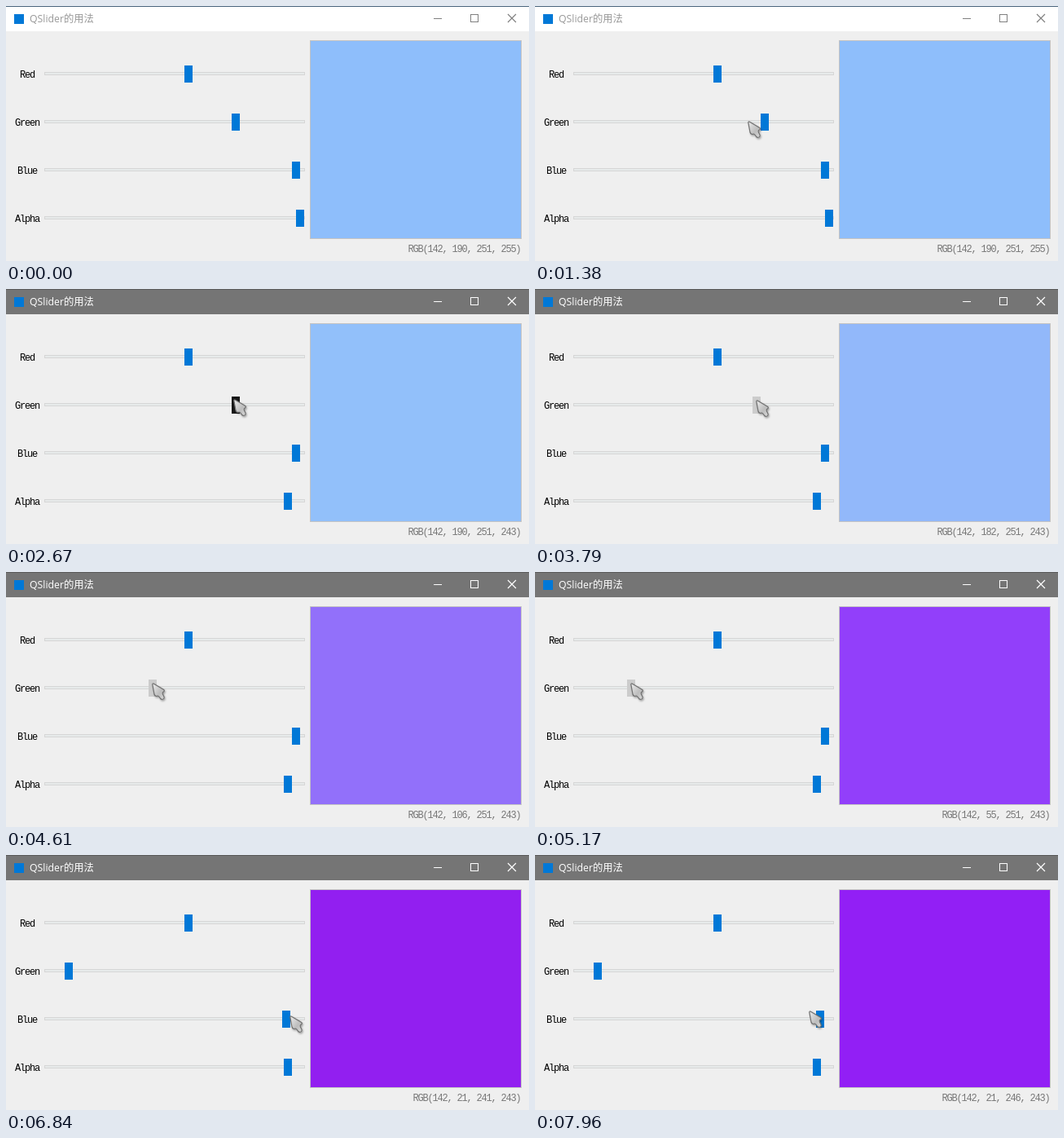
These frames come from a looping animation (642 px wide and 313 px high, 8000 ms). An HTML page:

```html
<!DOCTYPE html>
<html lang="zh">
<head>
<meta charset="utf-8">
<title>QSlider的用法</title>
<style>
  html, body { margin: 0; width: 100%; height: 100%; overflow: hidden; background: #efefef; }
  svg { display: block; width: 642px; height: 313px; }
  rect { shape-rendering: crispEdges; }
  .caption { font: 12.3px "Open Sans", "Noto Sans CJK SC", "Noto Sans CJK", sans-serif; fill: #999; }
  .mono { font: 12px "Liberation Mono", monospace; letter-spacing: -1.2px; }
  #bar { fill: #fff; }
  #edge { fill: #49647c; }
  #buttons { stroke: #808080; fill: none; }
  .active #bar { fill: #757575; }
  .active #edge { fill: #5b5b5b; }
  .active .caption { fill: #fff; }
  .active #buttons { stroke: #fff; }
  .groove { fill: #e7eaea; stroke: #d6d6d6; }
  .handle { fill: #0078d7; }
  .handle.hover { fill: #171717; }
  .handle.pressed { fill: #ccc; }
</style>
</head>
<body>
<svg id="win" viewBox="0 0 642 313">
  <defs>
    <linearGradient id="steel" x1="0" y1="0" x2="1" y2="1">
      <stop offset="0" stop-color="#ececec"/>
      <stop offset=".6" stop-color="#bdbdbd"/>
      <stop offset="1" stop-color="#d8d8d8"/>
    </linearGradient>
    <filter id="shade" x="-50%" y="-50%" width="200%" height="200%">
      <feDropShadow dx="1" dy="1.5" stdDeviation="1" flood-opacity=".35"/>
    </filter>
  </defs>
  <rect width="642" height="313" fill="#efefef"/>
  <rect id="bar" width="642" height="31"/>
  <rect id="edge" width="642" height="1"/>
  <rect x="10" y="10" width="12" height="12" fill="#0078d7"/>
  <text class="caption" x="29" y="20">QSlider的用法</text>
  <g id="buttons">
    <path d="M525 15.5h10M570.5 10.5h9v9h-9z" shape-rendering="crispEdges"/>
    <path d="M616 10l10 10m0-10l-10 10" stroke-width="1.2"/>
  </g>
  <g id="rows"></g>
  <rect id="swatch" x="373.5" y="42.5" width="259" height="243" stroke="#c3c3c3"/>
  <text id="readout" class="mono" x="631.5" y="302" text-anchor="end" fill="#787878"></text>
  <path id="cursor" fill="url(#steel)" stroke="#707070" stroke-width="1.2" stroke-linejoin="round" filter="url(#shade)"
    d="M.8 1.8Q1 .5 2.5 1.2L14 8Q17 10 13.5 11.5Q12.5 13 14.5 16Q16 19 14 20Q11 21 10 18.5Q8 15 5.5 16.5Q3.5 16 3 14Z"/>
</svg>
<script>
const LOOP = 8000, START = 345, TICK = 92.6, ACTIVATE = 18;
const $ = id => document.getElementById(id);
const clamp = v => Math.min(1, Math.max(0, v));
const progress = (n, from, to) => clamp((n - from) / (to - from));
const mix = (a, b, f) => Math.round(a + (b - a) * f);

// Cursor legs: first tick, last tick, goal; it rests in between.
const home = [185, 256];
const legs = [
  [0, 2, 151, 205], [2, 7, 218, 85],
  [10, 11, 261, 141], [11, 16, 355, 264],
  [18, 21, 340, 264], [21, 25, 279, 135],
  [26, 29, 235, 90], [29, 33, 281, 136],
  [36, 56, 76, 136], [59, 67, 348, 197],
  [71, 76, 239, 192], [77, 82, 336, 191]
];

function pointer(n) {
  return legs.reduce(([x, y], [from, to, gx, gy]) => {
    const f = progress(n, from, to);
    return [mix(x, gx, f), mix(y, gy, f)];
  }, home);
}

// drag: press tick, tick of the last move, release tick
const rows = [
  { name: 'Red', value: () => 142 },
  { name: 'Green', drag: [36, 56, 59], value: n => mix(190, 21, progress(n, 36, 56)) },
  { name: 'Blue', value: n => n < 70 ? 251 : n < 71 ? 241 : 246 },
  { name: 'Alpha', drag: [18, 21, 21], value: n => mix(255, 243, progress(n, 18, 21)) }
];

function add(tag, attrs) {
  const el = document.createElementNS('http://www.w3.org/2000/svg', tag);
  for (const k in attrs) el.setAttribute(k, attrs[k]);
  return $('rows').appendChild(el);
}

rows.forEach((row, i) => {
  row.top = 73 + 59 * i;
  add('text', { class: 'mono', x: 26 - 3 * row.name.length, y: row.top + 15 }).textContent = row.name;
  add('rect', { class: 'groove', x: 47.5, y: row.top + 8.5, width: 319, height: 3 });
  row.handle = add('rect', { y: row.top, width: 10, height: 21 });
});

function draw(t) {
  const n = Math.floor((t - START) / TICK);
  const [cx, cy] = pointer(n);
  const shown = n >= 0;
  const rgba = rows.map(({ value, drag, top, handle }) => {
    const v = value(n);
    const x = Math.floor(46.5 + v * 310 / 255);
    const dx = cx + 1 - x, dy = cy - top;
    const pressed = drag && n >= drag[0] && n <= drag[2];
    const hover = shown && dx >= 0 && dx < 10 && dy >= 0 && dy < 21;
    handle.setAttribute('x', x);
    handle.setAttribute('class', 'handle' + (pressed ? ' pressed' : hover ? ' hover' : ''));
    return v;
  });
  const [r, g, b, a] = rgba;
  $('swatch').setAttribute('fill', `rgba(${r},${g},${b},${a / 255})`);
  $('readout').textContent = `RGB(${rgba.join(', ')})`;
  $('win').classList.toggle('active', n >= ACTIVATE);
  $('cursor').setAttribute('visibility', shown ? 'visible' : 'hidden');
  $('cursor').setAttribute('transform', `translate(${cx} ${cy})`);
}

const t0 = performance.now();
function frame() {
  draw((performance.now() - t0) % LOOP);
  requestAnimationFrame(frame);
}
frame();
</script>
</body>
</html>
```
